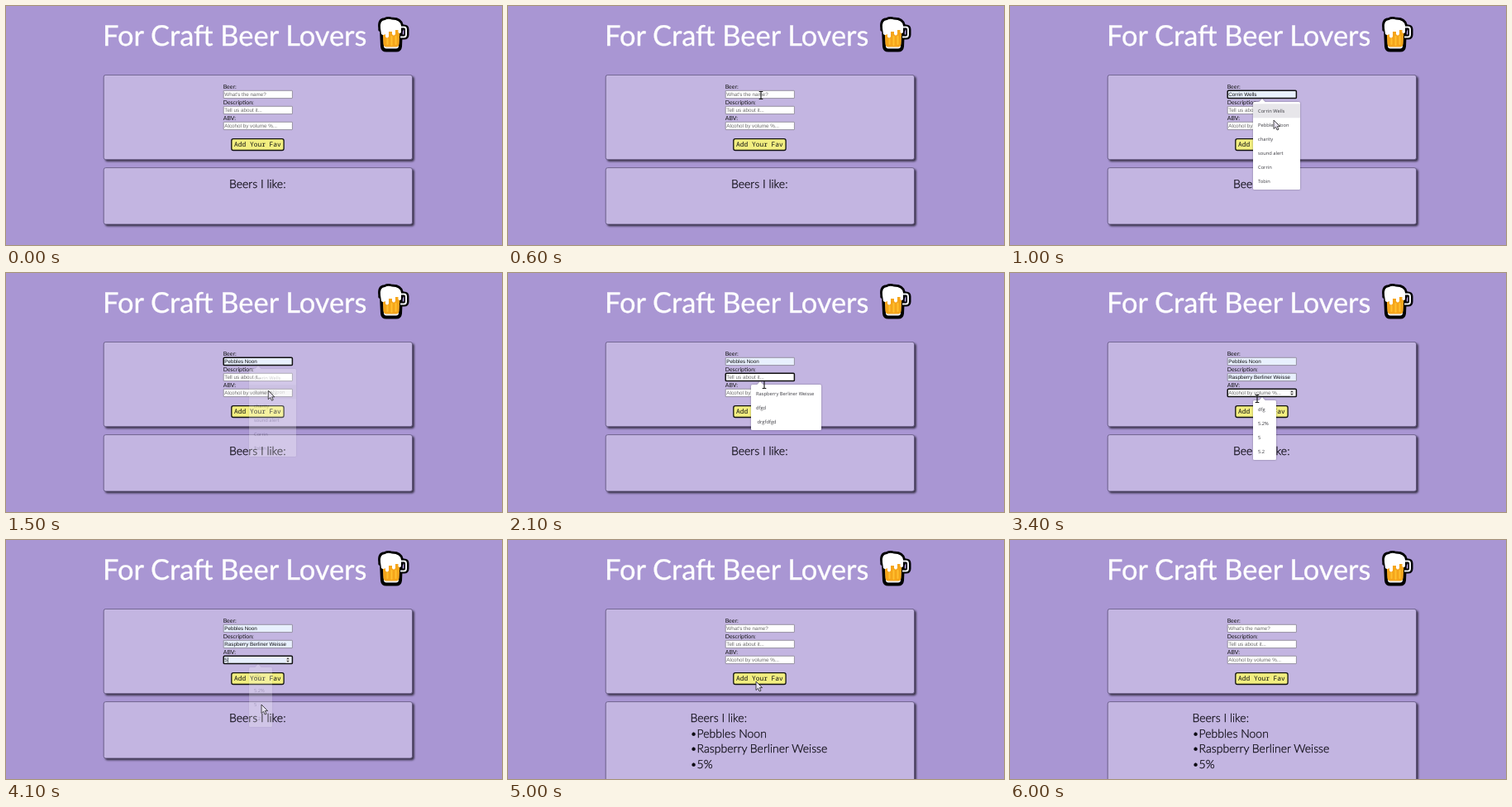
Write an HTML page that moves like this. It is 600x289 px and loops after 6.2 s.

```html
<!DOCTYPE html>
<html lang="en">
<head>
<meta charset="utf-8">
<title>For Craft Beer Lovers</title>
<style>
  html, body { margin: 0; width: 100%; height: 100%; overflow: hidden; background: #a996d3; }
  svg { display: block; width: 600px; height: 289px; text-rendering: geometricPrecision; }
  .title { font: 34.4px Lato, sans-serif; fill: #fff; stroke: #fff; stroke-width: .3; }
  .label { font: 6.95px Lato, sans-serif; fill: #111; }
  .list { font: 300 14px Lato, sans-serif; fill: #0c0a12; stroke: #0c0a12; stroke-width: .28; }
  .field { font: 6.3px "Liberation Sans", Arial, sans-serif; }
  .button { font: 7.9px "Noto Sans Mono", monospace; fill: #111; }
  .menu { font: 5.75px "Open Sans", sans-serif; fill: #3a3a40; }
  .panel { fill: #c3b5e1; stroke: #5d527c; stroke-width: .8; filter: drop-shadow(2px 2px 1px #3a334a); }
  .popup { filter: drop-shadow(0 .5px 1px #0005); }
</style>
</head>
<body>
<svg viewBox="0 0 600 289">
  <rect width="600" height="289" fill="#a996d3"/>
  <text class="title" x="117" y="48">For Craft Beer Lovers</text>

  <g id="mug" stroke-linejoin="round">
    <path d="M477 25.500H481.500Q484.500 25.500 484.500 28.500V34.500Q484.500 37.500 481.500 37.500H477"
      fill="none" stroke="#000" stroke-width="6"/>
    <path d="M454 27L455 49Q455.500 53.500 460 53.500H472Q476.500 53.500 477 49L478 27Z"
      fill="#eef0f4" stroke="#000" stroke-width="4"/>
    <path d="M452 27Q450.500 16 458 16Q462 13.800 467 15.500Q477 15 479 23V29H452Z"
      fill="#fff" stroke="#000" stroke-width="3.400"/>
    <path d="M477 25.500H481.500Q484 25.500 484 28.500V34.500Q484 37.500 481.500 37.500H477"
      fill="none" stroke="#f4f5f8" stroke-width="2"/>
    <path d="M455.500 28L456.500 46Q457 49.500 460 49.500H472Q475 49.500 475.500 46L476.500 28Z" fill="#f5a51b"/>
    <path d="M461.500 40V46M466.500 37V47M471.500 37V46" stroke="#ffc02e" stroke-width="2" stroke-linecap="round"/>
    <path d="M453 27Q452 17 458.500 17Q462 15 467 16.500Q477 16.500 478 24V32Q476 34 474.500 32V29H471V34Q469 37 467 34V31H463V37Q461 40 459 37V34Q456 36 454 34Z" fill="#fff"/>
  </g>

  <rect class="panel" x="118.200" y="83.400" width="373.300" height="102.300" rx="2.500"/>
  <rect class="panel" id="listPanel" x="118.200" y="195.600" width="373.300" height="68.300" rx="2.500"/>
  <g id="fields"></g>
  <rect x="272.800" y="160.700" width="63.300" height="13.800" rx="2.200" fill="#f2ee80" stroke="#111" stroke-width="1.300"/>
  <text class="button" x="276" y="170.400">Add Your Fav</text>
  <g id="list" class="list"></g>
  <g id="menu"></g>

  <g id="cursor">
    <path id="arrow" d="M0 0V10.500L2.500 8.300L4.200 12L6 11.200L4.400 7.600H7.600Z"
      fill="#e6e1f0" stroke="#222" stroke-width=".8"/>
    <path id="beam" d="M-2.300-4.500H-.7L0-4L.7-4.500H2.300M0-4V4M-2.300 4.500H-.7L0 4L.7 4.500H2.300"
      fill="none" stroke="#111" stroke-width="1.100"/>
  </g>
</svg>
<script>
const LOOP = 6200, STEP = 100;
const BEER = "Pebbles Noon", STYLE = "Raspberry Berliner Weisse";
const $ = id => document.getElementById(id);

const fields = [
  { label: "Beer:", hint: "What's the name?", y: 102 },
  { label: "Description:", hint: "Tell us about it...", y: 121 },
  { label: "ABV:", hint: "Alcohol by volume %...", y: 140 }
];
const menus = [
  { width: 57, rows: ["Corrin Wells", BEER, "charity", "sound alert", "Corrin", "Tobin"] },
  { width: 85, rows: [STYLE, "dfgd", " drgfdfgd"] },
  { width: 28, rows: ["dfg", "5.2%", "5", "5.2"] }
];

// Pointer stops: time, x, y, shape
const path = [
  [100, 593, 278, "arrow"], [300, 440, 188, "arrow"], [500, 322, 118, "arrow"],
  [600, 306, 108, "beam"], [800, 306, 109, "beam"], [900, 314, 126, "arrow"],
  [1000, 319, 138, "arrow"], [1200, 318, 143, "arrow"], [1600, 317, 142, "arrow"],
  [1800, 310, 127, "beam"], [2000, 310, 128, "beam"], [2100, 310, 135, "beam"],
  [2200, 311, 141, "arrow"], [2400, 312, 145, "arrow"], [2700, 312, 145, "arrow"],
  [2900, 302, 146, "beam"], [3300, 299, 146, "beam"], [3400, 299, 152, "beam"],
  [3500, 301, 163, "arrow"], [3700, 306, 184, "arrow"], [3900, 309, 199, "arrow"],
  [4200, 309, 199, "arrow"], [4500, 301, 172, "arrow"], [4700, 300, 171, "arrow"],
  [5600, 300, 171, "arrow"], [5700, 304, 195, "arrow"], [5900, 322, 280, "arrow"],
  [6000, 326, 295, "arrow"]
];

// Form state: time, then what changes
const steps = [
  [0, { focus: -1, values: ["", "", ""], menu: -1, hover: -1, alpha: 1, added: false }],
  [700, { focus: 0, menu: 0 }],
  [900, { values: ["Corrin Wells", "", ""], hover: 0 }],
  [1100, { values: [BEER, "", ""], hover: 1 }],
  [1500, { alpha: .25 }],
  [1600, { menu: -1, hover: -1, alpha: 1 }],
  [2000, { focus: 1, menu: 1 }],
  [2300, { values: [BEER, STYLE, ""], hover: 0 }],
  [2700, { alpha: .25 }],
  [2800, { menu: -1, hover: -1, alpha: 1 }],
  [3100, { focus: 2, menu: 2 }],
  [3500, { hover: 0 }],
  [3600, { hover: 1 }],
  [3800, { hover: 2, values: [BEER, STYLE, "5"] }],
  [4100, { alpha: .22, hover: -1 }],
  [4200, { menu: -1, alpha: 1 }],
  [4600, { focus: -1, values: ["", "", ""], added: true }]
];

const stateAt = t => Object.assign({}, ...steps.filter(s => s[0] <= t).map(s => s[1]));
const text = (x, y, cls, str, fill = "") =>
  `<text x="${x}" y="${y}" class="${cls}" xml:space="preserve"${fill && ` fill="${fill}"`}>${str}</text>`;

function drawField(f, i, s) {
  const value = s.values[i], on = s.focus === i, mid = f.y + 5;
  let out = text(262.7, f.y - 1.8, "label", f.label) +
    `<rect x="263.200" y="${f.y + .3}" width="83.200" height="9.300" rx="${on ? 1.2 : .5}"
      fill="${value ? "#e8f0fe" : "#fff"}" stroke="${on ? "#111" : "#85808f"}" stroke-width="${on ? 1.5 : .8}"/>` +
    text(264.3, f.y + 7.2, "field", value || f.hint, value ? "#111" : "#6c6c6c");
  if (i === 2 && on) {
    out += `<rect x="338.500" y="${f.y + 1.5}" width="5.500" height="7" fill="#efefef"/>
      <path d="M339.300 ${mid - .8}l1.700-2.200l1.700 2.200zm0 1.600l1.700 2.200l1.700-2.200z" fill="#444"/>`;
    if (value) out += `<path d="M268.500 ${f.y + 1.8}v6.500" stroke="#111" stroke-width=".6"/>`;
  }
  return out;
}

function drawMenu(s) {
  if (s.menu < 0) return "";
  const { width, rows } = menus[s.menu], top = fields[s.menu].y + 14;
  const height = rows.length * 17 + 4;
  const items = rows.map((row, i) => {
    const y = top + 2.3 + i * 17;
    const mark = i === s.hover ? `<rect x="294" y="${y}" width="${width}" height="17" fill="#e7e6ea"/>` : "";
    return mark + text(300, y + 10.4, "menu", row);
  }).join("");
  return `<g opacity="${s.alpha}"><g class="popup" fill="#fff">
    <rect x="294" y="${top}" width="${width}" height="${height}" rx="1.500"/>
    <path d="M301 ${top + .3}l4-4l4 4z"/></g>${items}</g>`;
}

function drawList(added) {
  $("listPanel").setAttribute("height", added ? 110 : 68.3);
  const lines = added ? ["Beers I like:", "•" + BEER, "•" + STYLE, "•5%"] : ["Beers I like:"];
  return lines.map((line, i) => text(added ? 220.5 : 270, 220.2 + i * 18.6, "list", line)).join("");
}

function drawCursor(t) {
  const last = path.length - 1;
  const shown = t >= path[0][0] && t < path[last][0];
  $("cursor").style.display = shown ? "" : "none";
  if (!shown) return;
  const i = path.findIndex(p => p[0] > t) - 1;
  const [t0, x0, y0, shape] = path[i], [t1, x1, y1] = path[i + 1];
  const k = (t - t0) / (t1 - t0);
  $("cursor").setAttribute("transform", `translate(${x0 + (x1 - x0) * k} ${y0 + (y1 - y0) * k})`);
  for (const id of ["arrow", "beam"]) $(id).style.display = id === shape ? "" : "none";
}

let shownAt = -1;
function render(now) {
  const t = Math.floor(now % LOOP / STEP) * STEP;
  if (t !== shownAt) {
    shownAt = t;
    const s = stateAt(t);
    $("fields").innerHTML = fields.map((f, i) => drawField(f, i, s)).join("");
    $("menu").innerHTML = drawMenu(s);
    $("list").innerHTML = drawList(s.added);
    drawCursor(t);
  }
}

const start = performance.now();
function tick() {
  render(performance.now() - start);
  requestAnimationFrame(tick);
}
tick();
</script>
</body>
</html>
```
